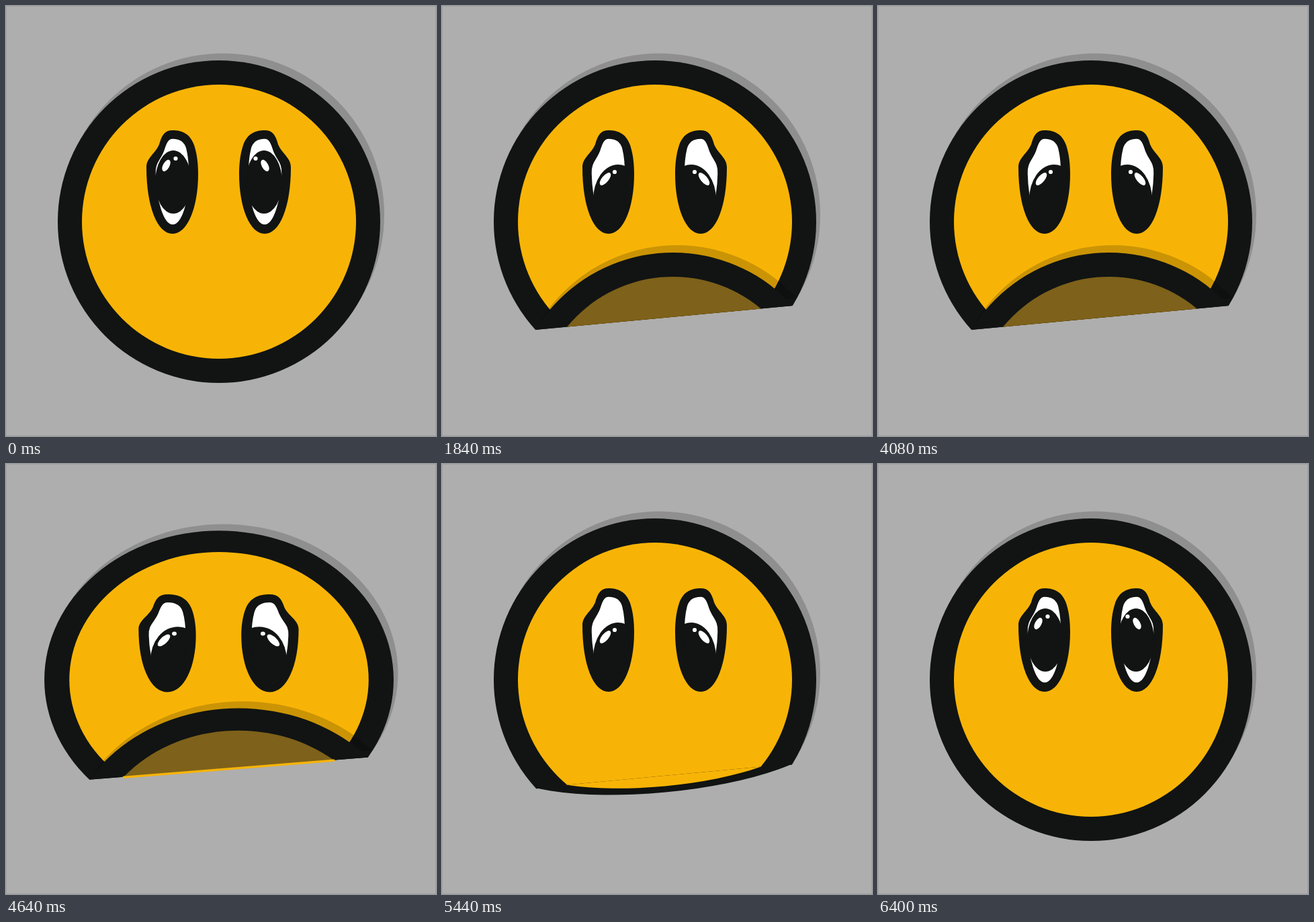
These frames come from a looping animation (640 by 640 pixels, 6.48 s). An HTML page with a canvas:

```html
<!DOCTYPE html>
<html lang="en">
<head>
<meta charset="utf-8">
<title>Sad face</title>
<style>
  html, body { margin: 0; width: 100%; height: 100%; overflow: hidden; background: #aeaeae; }
  canvas { display: block; width: 100vw; height: 100vh; }
</style>
</head>
<body>
<canvas id="stage" width="640" height="640"></canvas>
<script>
const ctx = document.getElementById('stage').getContext('2d');
const LOOP = 6480, STEP = 80;
const BLACK = '#111413', YELLOW = '#f8b406', BROWN = '#7e611a';
const SHADE = 'rgba(0,0,0,.18)';
const CX = 317, CY = 321, OUTER = 240, INNER = 204;
// The fold line: its middle, tilt and distance from the face centre.
const FOLD = { x: 330.4, y: 464, tilt: -0.0935, depth: 143.6 };
const MIRROR = 633, EYE_PIVOT = 348;

const EYE_OUTER = new Path2D('M248 185C262 185 274 190 280 207C285 222 286 238 286 250C286 300 270 339 248 339C225 339 209 298 209 240C209 226 222 220 228 206C232 192 236 185 248 185Z');
const EYE_INNER = new Path2D('M248 197C258 197 266 201 269 212C272 224 273 238 273 252C273 292 262 326 248 326C234 326 223 290 222 250C221 232 230 229 235 214C238 204 241 197 248 197Z');

const mix = (a, b, p) => a + (b - a) * p;
const ease = p => p < .5 ? 4 * p ** 3 : 1 - 4 * (1 - p) ** 3;

// Eased value between [time, value] keys.
function track(keys, t) {
  if (t <= keys[0][0]) return keys[0][1];
  for (let i = 1; i < keys.length; i++) {
    const [t0, a] = keys[i - 1], [t1, b] = keys[i];
    if (t < t1) return mix(a, b, ease((t - t0) / (t1 - t0)));
  }
  return keys[keys.length - 1][1];
}

const JAW = [[80, 1], [360, 1.7], [1000, -1], [5120, -1], [5705, 1]];
const SAD = [[160, 0], [860, 1], [5760, 1], [6320, 0]];
const LOOK = [[2240, 0], [2560, -1.3], [2880, -1.3], [3200, 0]];
const WIDE = [[4540, 1], [4640, 1.083], [4760, 1.31], [4920, .94], [5040, 1]];
const TALL = [[4540, 1], [4640, .924], [4760, .72], [4920, 1.09], [5040, 1]];

function ellipse(color, x, y, rx, ry = rx, turn = 0) {
  ctx.fillStyle = color;
  ctx.beginPath();
  ctx.ellipse(x, y, rx, ry, turn, 0, Math.PI * 2);
  ctx.fill();
}

function group(draw) {
  ctx.save();
  draw();
  ctx.restore();
}

function scaleAbout(x, y, sx, sy) {
  ctx.translate(x, y);
  ctx.scale(sx, sy);
  ctx.translate(-x, -y);
}

function toFold() {
  ctx.translate(FOLD.x, FOLD.y);
  ctx.rotate(FOLD.tilt);
}

function clipRect(x, y, w, h) {
  ctx.beginPath();
  ctx.rect(x, y, w, h);
  ctx.clip();
}

function disc(x, y, fill, inner = INNER) {
  ellipse(BLACK, x, y, OUTER);
  ellipse(fill, x, y, inner);
}

function head(jaw, wide) {
  group(() => {
    if (jaw !== 1) {
      toFold();
      // A small overlap hides the seam while the flap hangs down.
      clipRect(-400, -600, 800, 600 + (jaw > 0 ? 1.5 : 0));
      ctx.rotate(-FOLD.tilt);
      ctx.translate(-FOLD.x, -FOLD.y);
    }
    ellipse(SHADE, 323, 310.5, OUTER);
    disc(CX, CY, YELLOW, INNER + 20 * (wide - 1));
    if (jaw < 0) flap(jaw, () => ellipse(SHADE, 0, -FOLD.depth, OUTER), 6, -11);
  });
  if (jaw !== 1) flap(jaw, () => disc(0, -FOLD.depth, jaw < 0 ? BROWN : YELLOW));
}

// The part of the disc below the fold, scaled across it.
function flap(jaw, draw, dx = 0, dy = 0) {
  group(() => {
    ctx.translate(dx, dy);
    toFold();
    ctx.scale(1, jaw);
    clipRect(-300, 0, 600, 200);
    draw();
  });
}

function foldEdge() {
  group(() => {
    toFold();
    ctx.fillStyle = YELLOW;
    ctx.fillRect(-146, -1, 292, 3.5);
  });
}

function eye(sad, look) {
  ctx.fillStyle = BLACK;
  ctx.fill(EYE_OUTER);
  ctx.fillStyle = '#fff';
  ctx.fill(EYE_INNER);
  group(() => {
    ctx.clip(EYE_INNER);
    ellipse(BLACK, mix(249, 262, sad) + look, mix(262, 288, sad), mix(27, 37, sad), mix(47, 52, sad));
  });
  ctx.strokeStyle = BLACK;
  ctx.lineWidth = 1.5;
  ctx.stroke(EYE_INNER);
}

function glints(sad, look, side) {
  const drift = (1 - sad) * -4.5 + look;
  const place = x => (side < 0 ? x : MIRROR - x) + drift;
  const lift = mix(-20, 0, sad);
  ellipse('#fff', place(243), 257.5 + lift, mix(4.8, 5, sad), mix(9.5, 11.5, sad), -side * mix(.5, .7, sad));
  ellipse('#fff', place(257), 247 + lift, 3.1);
}

function eyes(sad, look) {
  eye(sad, look);
  group(() => {
    ctx.translate(MIRROR, 0);
    ctx.scale(-1, 1);
    eye(sad, -look);
  });
  glints(sad, look, -1);
  glints(sad, look, 1);
}

function render(t) {
  const jaw = track(JAW, t), sad = track(SAD, t), look = track(LOOK, t);
  const wide = track(WIDE, t), tall = track(TALL, t);
  ctx.fillStyle = '#aeaeae';
  ctx.fillRect(0, 0, 640, 640);
  ctx.strokeStyle = '#a2a2a2';
  ctx.lineWidth = 1;
  ctx.strokeRect(.5, .5, 639, 639);
  group(() => {
    scaleAbout(CX, CY, wide, tall);
    head(jaw, wide);
    if (wide > 1) foldEdge();
  });
  group(() => {
    scaleAbout(CX, EYE_PIVOT, mix(1, wide, 1.3), mix(1, tall, .72));
    eyes(sad, look);
  });
}

const start = performance.now();
function tick() {
  const t = (performance.now() - start) % LOOP;
  render(Math.floor(t / STEP) * STEP);
  requestAnimationFrame(tick);
}
tick();
</script>
</body>
</html>
```
